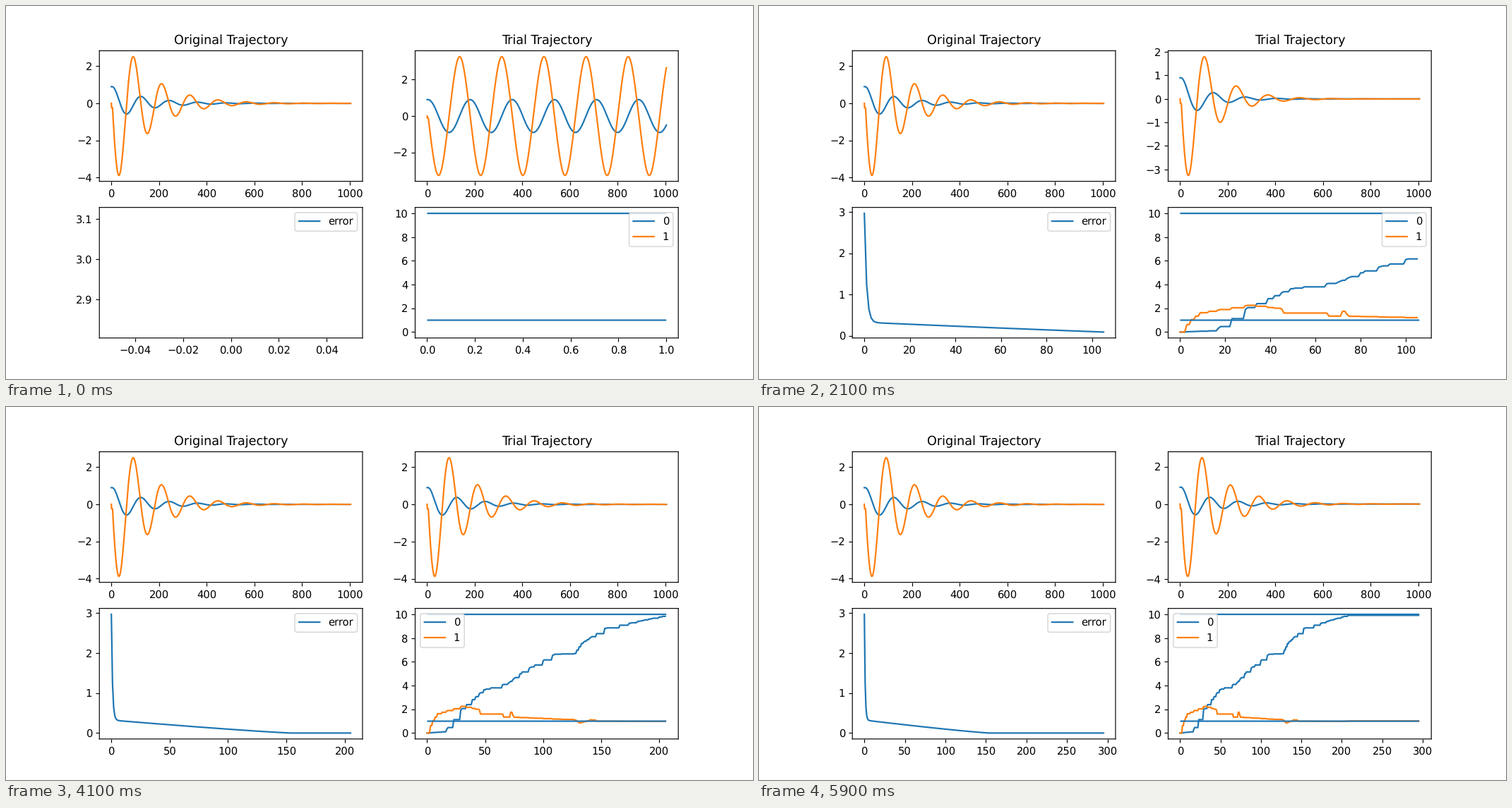
A matplotlib script that plays this animation: 1058x529 px, repeating every 6 s.

```python
import math

import matplotlib.pyplot as plt
import numpy as np
from matplotlib.animation import FuncAnimation

# Soft, unsnapped edges, as in a smoothly scaled rendering
plt.rcParams.update({"path.snap": False, "text.hinting": "no_hinting"})

FRAMES, INTERVAL = 60, 100
EVALS_PER_FRAME = 5
EVALS = np.arange(FRAMES * EVALS_PER_FRAME)
ACCEPT_RATE = 0.3

# Pendulum with a linear spring and viscous damping
TRUE_PARAMS = (10, 1)
DT, STEPS, HOLD = 0.01, 1000, 5
START_ANGLE = 0.9
GRAVITY, INV_INERTIA = 14.0, 1.45

# Key points (evaluation, value) of the parameter search
STIFFNESS = [(0, 0), (13, 0.1), (17, 0.33), (30, 2.06), (49, 3.65), (70, 4.2),
             (82, 5.15), (110, 6.64), (127, 6.7), (133, 7.55), (153, 8.82),
             (200, 9.78), (208, 9.92)]
DAMPING = [(0, 0), (5, 1.05), (9, 1.63), (30, 2.25), (45, 1.95), (46, 1.6),
           (65, 1.6), (66, 1.34), (71, 1.34), (72, 1.75), (75, 1.33),
           (127, 1.1), (131, 0.85), (135, 0.94), (141, 1.12), (146, 1),
           (200, 0.98), (208, 1.02)]


def search_path():
    """Move between key points, but only at accepted evaluations."""
    accepted = np.random.default_rng(4).random(len(EVALS)) < ACCEPT_RATE
    accepted[[step for step, _ in STIFFNESS + DAMPING]] = True
    last_accepted = np.maximum.accumulate(np.where(accepted, EVALS, 0))
    return np.column_stack([np.interp(last_accepted, *zip(*points))
                            for points in (STIFFNESS, DAMPING)])


def simulate(stiffness, damping):
    angle, speed = START_ANGLE, 0.0
    states = [(angle, speed)]
    for step in range(STEPS):
        torque = stiffness * angle + damping * speed
        speed -= DT * (GRAVITY * math.sin(angle) + INV_INERTIA * torque)
        angle += DT * speed
        states += [(angle, speed)] * (HOLD if step == 0 else 1)
    return np.array(states)


params = search_path()
# Steep first gains, then a slow, almost linear decline to zero
errors = (2.641 * np.exp(-1.05 * EVALS)
          + 0.325 * np.clip(1 - EVALS / 155, 0.01, 1) ** 1.15)

fig, ((ax_true, ax_trial), (ax_error, ax_params)) = plt.subplots(
    2, 2, figsize=(10, 5), dpi=105.8)
ax_true.set_title("Original Trajectory")
ax_true.plot(simulate(*TRUE_PARAMS))


def update(frame):
    count = frame * EVALS_PER_FRAME + 1
    for ax in (ax_trial, ax_error, ax_params):
        ax.clear()

    ax_trial.set_title("Trial Trajectory")
    ax_trial.plot(simulate(*params[count - 1]))

    ax_error.plot(errors[:count], label="error")
    ax_error.legend()

    ax_params.plot(params[:count], label=["0", "1"])
    ax_params.hlines(TRUE_PARAMS, 0, count)
    ax_params.legend()


anim = FuncAnimation(fig, update, frames=FRAMES, interval=INTERVAL,
                     repeat=True, repeat_delay=0)
plt.show()
```
